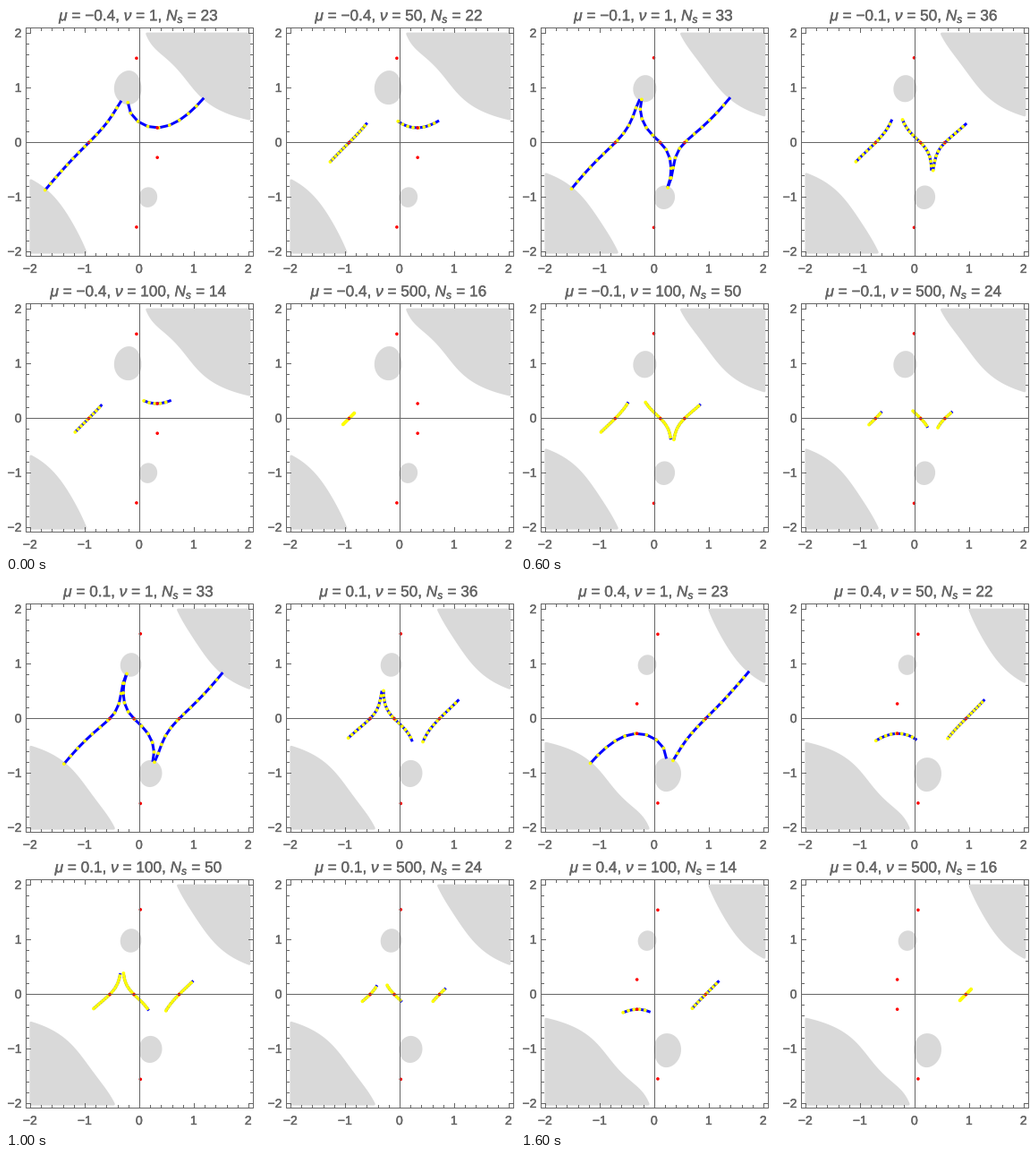
These frames come from a looping animation (569 px wide and 612 px high, 1.7 s). A matplotlib script:

```python
import numpy as np
import matplotlib.pyplot as plt
from matplotlib.animation import FuncAnimation
from matplotlib.patches import Circle
from matplotlib.patheffects import withStroke

W, H, DPI = 569, 612, 100
PX = 72 / DPI                    # points per pixel
UNIT = 61                        # pixels per data unit
X0, Y0 = 149.4, 152.6            # data origin in the first panel
AX, AY = 149.5, 152.5            # axis lines in the first panel
LEFT, RIGHT, TOP, BOTTOM = 22.5, 276.5, 24.5, 279.5
STEP = 0.5 / UNIT
INK, SHADE = "#666666", "#d9d9d9"
PANELS = {1: (0, 0), 50: (291, 0), 100: (0, 308), 500: (291, 308)}

# Segment counts quoted in the titles, at these |mu|.
KNOTS = [0, 0.1, 0.2, 0.4]
SEGMENTS = {
    1: [30, 33, 22, 23],
    50: [32, 36, 24, 22],
    100: [44, 50, 18, 14],
    500: [40, 24, 38, 16],
}

plt.rcParams.update({
    "font.family": "Liberation Sans",
    "mathtext.fontset": "custom",
    "mathtext.rm": "Liberation Sans",
    "mathtext.it": "Liberation Sans:italic",
})


def action(z, mu):
    return (z - mu) ** 2 / 2 + 1 / (1 + z * z)


def slope(z, mu):
    return z - mu - 2 * z / (1 + z * z) ** 2


def saddles(mu):
    return np.roots([1, -mu, 2, -2 * mu, -1, -mu])


def is_real(z):
    return abs(z.imag) < 1e-6


def arm(z, mu, sign, top):
    """Steepest ascent of Im S from a saddle, left or right, up to a level."""
    curv = 1 - (2 - 6 * z * z) / (1 + z * z) ** 3
    way = np.sqrt(1j * np.conj(curv) / abs(curv))
    if way.real * sign < 0:
        way = -way

    def uphill(p):
        g = 1j * np.conj(slope(p, mu))
        return g / abs(g)

    points = [z, z + STEP * way]
    while action(points[-1], mu).imag < top and len(points) < 300:
        z = points[-1]
        points.append(z + STEP * uphill(z + STEP / 2 * uphill(z)))
    return points


def thimbles(mu, nu):
    """Curves in order from left to right, for any sign of mu."""
    if mu > 0:
        return [-path[::-1] for path in thimbles(-mu, nu)[::-1]]
    top = min(1, 9 / nu)
    roots = saddles(mu)
    ends = sorted((complex(z.real) for z in roots if is_real(z)),
                  key=lambda z: z.real)
    if len(ends) == 1:
        ends.append(min((z for z in roots if z.imag > 1e-6),
                        key=lambda z: z.imag))
    pairs = [(z, z) for z in ends]
    if mu < -0.18 and len(ends) == 3:
        # Close to the caustic the two right curves join along the axis.
        pairs = [pairs[0], (ends[1], ends[2])]
    return [np.array(arm(a, mu, -1, top)[::-1] + arm(b, mu, 1, top))
            for a, b in pairs if action(a, mu).imag < top]


def split(paths, total):
    """Cut the paths into segments, sparser where a path avoids the axis."""
    arcs = [np.r_[0, np.cumsum(abs(np.diff(p)))] for p in paths]
    weights = [a[-1] * (1 if abs(p.imag).min() < 1e-3 else 0.7)
               for a, p in zip(arcs, paths)]
    share = np.cumsum([0] + weights)
    counts = np.diff(np.rint(total * share / share[-1]).astype(int))
    return [np.interp(np.linspace(0, a[-1], n + 1), a, p)
            for p, a, n in zip(paths, arcs, counts)]


def number(mu):
    text = f"{abs(mu):.2f}".rstrip("0")
    return ("\u2212" if mu < 0 else "") + text


fig = plt.figure(figsize=(W / DPI, H / DPI), dpi=DPI, facecolor="white")
ax = fig.add_axes([0, 0, 1, 1])
ax.set_xlim(0, W)
ax.set_ylim(H, 0)
ax.axis("off")
ax.set_autoscale_on(False)

grid = np.linspace(-2, 2, 300)
gx, gy = np.meshgrid(grid, grid)
live = []


def crisp(v):
    return np.floor(v) + 0.5


def line(xs, ys):
    ax.plot(xs, ys, color=INK, lw=PX, zorder=6, snap=False,
            solid_capstyle="projecting")


def label(x, y, text, size, ha="center"):
    return ax.text(x, y, text, size=size * PX, color=INK, ha=ha,
                   va="baseline",
                   path_effects=[withStroke(linewidth=0.4 * PX,
                                            foreground=INK)])


def draw_frame(dx, dy):
    l, r, t, b = LEFT + dx, RIGHT + dx, TOP + dy, BOTTOM + dy
    cx, cy = AX + dx, AY + dy
    line([l, r, r, l, l], [t, t, b, b, t])
    line([l, r], [cy, cy])
    line([cx, cx], [t, b])
    for k in range(-10, 11):
        size = 3 if k % 5 else 5
        x, y = crisp(cx + k * UNIT / 5), crisp(cy - k * UNIT / 5)
        for edge, d in ((t, size), (b, -size)):
            line([x, x], [edge, edge + d])
        for edge, d in ((l, size), (r, -size)):
            line([edge, edge + d], [y, y])
        if k % 5 == 0:
            text = str(k // 5).replace("-", "\u2212")
            label(x - 0.7, b + 18.5, text, 14)
            label(l - 5, y + 4.5, text, 14, "right")


def draw_panel(mu, nu, dx, dy):
    ox, oy = X0 + dx, Y0 + dy
    level = np.clip(action(gx + 1j * gy, mu).imag, 0, 2)
    area = ax.contourf(ox + UNIT * gx, oy - UNIT * gy, level, [1, 3],
                       colors=[SHADE], zorder=1)
    area.set_edgecolor(SHADE)
    area.set_linewidth(3 * PX)
    live.append(area)

    def dots(zs, color, radius, order):
        for z in zs:
            spot = Circle((ox + UNIT * z.real, oy - UNIT * z.imag), radius,
                          facecolor=color, edgecolor="none", zorder=order)
            live.append(ax.add_patch(spot))

    total = int(round(np.interp(abs(mu), KNOTS, SEGMENTS[nu])))
    for path in split(thimbles(mu, nu), total):
        live.extend(ax.plot(ox + UNIT * path.real, oy - UNIT * path.imag,
                            color="#0000ff", lw=3 * PX, zorder=3,
                            solid_capstyle="butt"))
        dots(path[:-1], "#ffff00", 1.9, 4)
    dots(saddles(mu), "#ff0000", 1.8, 5)

    title = f"$\\mu$ = {number(mu)}, $\\nu$ = {nu}, $N_s$ = {total}"
    live.append(label(149 + dx, 16.2 + dy, title, 17.2))


def draw(i):
    while live:
        live.pop().remove()
    mu = (i - 8) / 20
    for nu, (dx, dy) in PANELS.items():
        draw_panel(mu, nu, dx, dy)
    return live


for offset in PANELS.values():
    draw_frame(*offset)

anim = FuncAnimation(fig, draw, frames=17, interval=100, repeat=True,
                     repeat_delay=0, blit=False)
plt.show()
```
